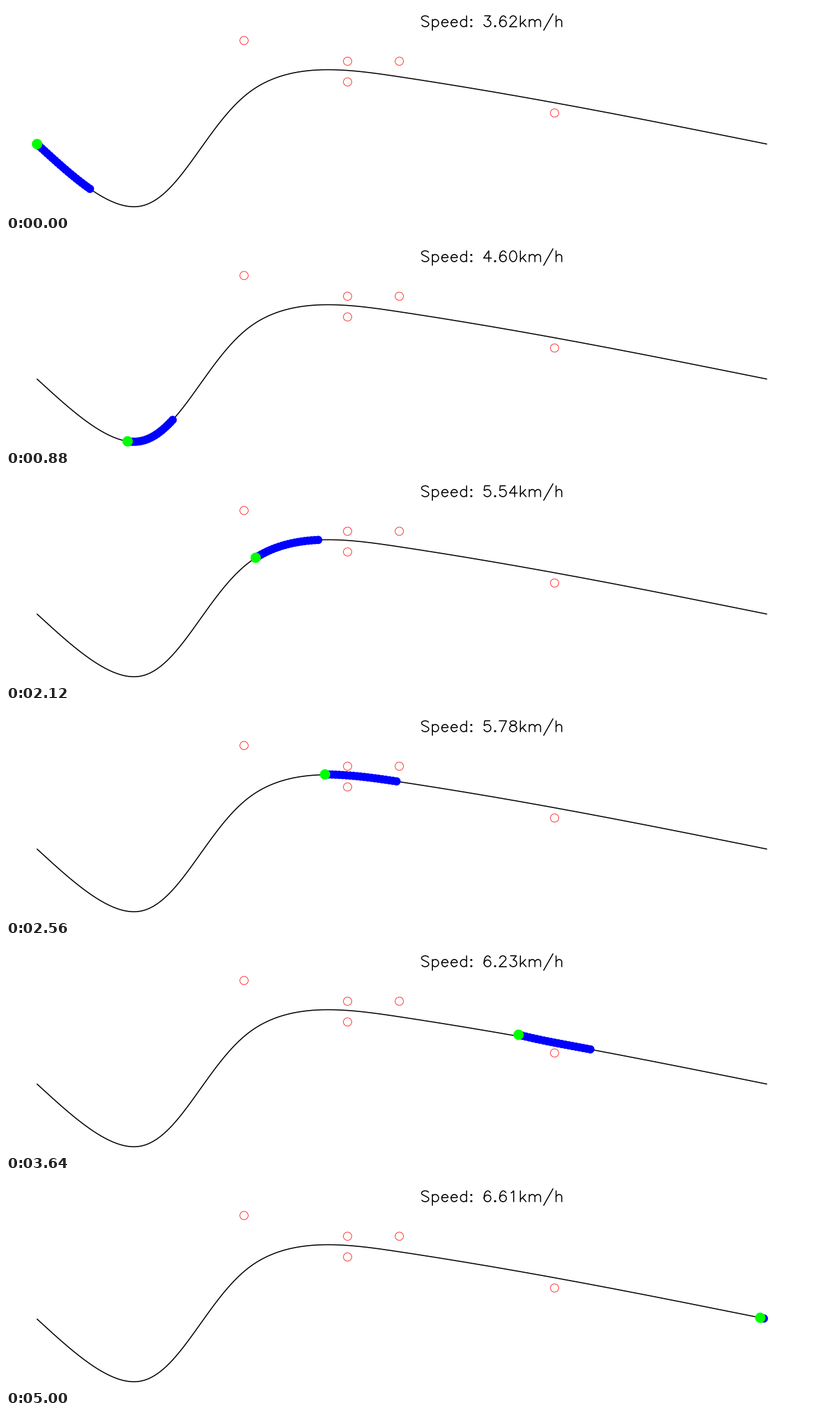
Animation, 1280 px wide and 320 px high, one loop 5.04 s. Source, as a matplotlib script:

```python
import numpy as np
import matplotlib.pyplot as plt
from matplotlib.animation import FuncAnimation
from matplotlib.collections import LineCollection, PolyCollection

W, H, DPI = 1280, 320, 80
PX = 72 / DPI                      # one pixel in points
FRAMES, LAST = 252, 250
SCALE, X0, Y0 = 16, 48, 213.4      # pixels per metre, world origin
DOTS = 20


def spline(t, y):
    """Natural cubic spline through (t, y)."""
    t, y = np.asarray(t, float), np.asarray(y, float)
    h, n = np.diff(t), len(t)
    a, b = np.eye(n), np.zeros(n)
    for i in range(1, n - 1):
        a[i, i - 1:i + 2] = h[i - 1], 2 * (h[i - 1] + h[i]), h[i]
        b[i] = 6 * ((y[i + 1] - y[i]) / h[i] - (y[i] - y[i - 1]) / h[i - 1])
    m = np.linalg.solve(a, b)

    def f(u):
        i = np.clip(np.searchsorted(t, u, side="right") - 1, 0, n - 2)
        p, q, k = t[i + 1] - u, u - t[i], h[i]
        return ((m[i] * p**3 + m[i + 1] * q**3) / (6 * k)
                + (y[i] / k - m[i] * k / 6) * p
                + (y[i + 1] / k - m[i + 1] * k / 6) * q)
    return f


def smooth(t, y):
    """Cubic trend plus a spline through what it leaves over."""
    t = np.asarray(t, float)
    trend = np.poly1d(np.polyfit(t / LAST, y, 3))
    rest = spline(t, y - trend(t / LAST))
    return lambda u: trend(u / LAST) + rest(u)


# Reference course
wx = np.array([0, 10, 20.5, 35, 70.5])
wy = np.array([0, -6, 5, 6.5, 0])
knots = np.concatenate([[0], np.cumsum(np.hypot(np.diff(wx), np.diff(wy)))])
length = knots[-1]
course_x = spline(knots, X0 + SCALE * wx)
course_y = spline(knots, Y0 - SCALE * wy)


def place(s, d=0.0):
    """Point at distance s along the course, d pixels to its left."""
    e = 0.01
    dx = course_x(s + e) - course_x(s - e)
    dy = course_y(s + e) - course_y(s - e)
    r = np.hypot(dx, dy)
    return np.column_stack([course_x(s) + d * dy / r,
                            course_y(s) - d * dx / r])


# Motion along the course
ss = np.linspace(0, length, 2000)
when = [0, 27, 44, 54, 81, 106, 135, 150, 162, 182, 223, 250]
seen = [48, 133, 188, 219, 299, 386, 531, 613, 680, 792, 1017, 1166]
travel = smooth(when, np.interp(seen, course_x(ss), ss))(np.arange(LAST + 1.0))
step = (travel[-1] - travel[-8]) / 7
travel = np.concatenate([travel, travel[-1] + step * np.arange(1, 40)])
ticks = np.arange(len(travel))

speed = smooth([0, 44, 106, 150, 182, 223, 250],
               [3.62, 4.60, 5.54, 5.99, 6.23, 6.48, 6.61])


def drift(n):
    return np.interp(n, [106, 130, 150, 182, 223], [0, 0.5, 3.7, 2.4, 0])


def reach(n):
    return np.interp(n, [0, 44, 106, 150, 200], [26, 23, 20, 20.6, 20])


# Single-stroke lettering: 21 units cap height, y upwards
def arc(cx, cy, rx, ry, a, b):
    t = np.radians(np.linspace(a, b, int(abs(b - a) / 22.5) + 2))
    return list(zip(cx + rx * np.cos(t), cy + ry * np.sin(t)))


def shoulder(x):
    return [(x, 10)] + arc(x + 6, 9, 5, 5, 130, 0) + [(x + 11, 0)]


def dot(y):
    return arc(5, y, 1, 1, 0, 360)


six = arc(11, 9, 7, 12, 45, 180) + arc(10.5, 6.5, 6.5, 6.5, 180, 540)

GLYPHS = {
    "S": [arc(10, 16.5, 7, 4.5, 25, 250) + arc(10, 5, 7, 5, 70, -155)],
    "p": [[(4, 14), (4, -7)], arc(9.5, 7, 6.5, 7, 148, -148)],
    "e": [[(3, 8)] + arc(9.2, 7, 6.2, 7, 8, 325)],
    "d": [[(15, 21), (15, 0)], arc(9.5, 7, 6.5, 7, 32, 328)],
    "k": [[(4, 21), (4, 0)], [(14, 14), (4, 4)], [(8, 8), (15, 0)]],
    "m": [[(4, 14), (4, 0)], shoulder(4), shoulder(15)],
    "h": [[(4, 21), (4, 0)], shoulder(4)],
    "/": [[(20, 25), (2, -7)]],
    ":": [dot(13), dot(1)],
    ".": [dot(1)],
    " ": [],
    "0": [arc(10, 10.5, 7, 10.5, 0, 360)],
    "1": [[(6, 17), (8, 18), (11, 21), (11, 0)]],
    "2": [arc(10, 15.5, 6, 5.5, 175, -25) + [(3, 0), (17, 0)]],
    "3": [[(5, 21), (16, 21), (10, 13)] + arc(10, 6.5, 7, 6.5, 80, -160)],
    "4": [[(13, 0), (13, 21), (3, 7), (18, 7)]],
    "5": [[(15, 21), (5, 21), (4, 12)] + arc(10, 7, 7, 7, 130, -157)],
    "6": [six],
    "7": [[(3, 21), (17, 21), (7, 0)]],
    "8": [arc(10, 16.8, 6, 4.2, 0, 360), arc(10, 6.2, 7, 6.2, 0, 360)],
    "9": [[(20 - x, 21 - y) for x, y in six]],
}
ADVANCE = {"p": 19, "e": 18, "d": 19, "k": 17, "m": 30, "h": 19,
           "/": 22, ":": 10, ".": 10, " ": 16}


def lettering(text, x, y, size=0.8):
    strokes = []
    for ch in text:
        strokes += [np.array(s) * [size, -size] + [x, y] for s in GLYPHS[ch]]
        x += size * ADVANCE.get(ch, 20)
    return strokes


def disc(c, r):
    t = np.linspace(0, 2 * np.pi, 48, endpoint=False)
    return c + r * np.column_stack([np.cos(t), np.sin(t)])


fig = plt.figure(figsize=(W / DPI, H / DPI), dpi=DPI, facecolor="white")
ax = fig.add_axes([0, 0, 1, 1])
ax.set(xlim=(0, W), ylim=(H, 0))
ax.axis("off")

ax.plot(*place(np.linspace(0, length, 706)).T, color="black", lw=1.6 * PX,
        solid_capstyle="round", solid_joinstyle="round", snap=False, zorder=1)

for ox, oy in [(20, 10), (30, 6), (30, 8), (35, 8), (50, 3)]:
    ax.add_patch(plt.Circle((X0 + SCALE * ox, Y0 - SCALE * oy), 6.4,
                            fill=False, ec="red", lw=0.8 * PX, zorder=2))

car = PolyCollection([], edgecolors="none", linewidths=0, zorder=3)
label = LineCollection([], colors="black", linewidths=1.6 * PX, zorder=4,
                       capstyle="round", joinstyle="round", snap=False)
ax.add_collection(car, autolim=False)
ax.add_collection(label, autolim=False)


def draw(i):
    n = min(i, LAST)
    u = np.arange(1, DOTS + 1) / DOTS
    s = np.interp(n + u * reach(n), ticks, travel)
    plan = place(s, drift(n) * (1 - u) ** 4)[s < length]
    here = place(travel[n:n + 1], drift(n))[0]
    car.set_verts([disc(p, 6.4) for p in plan] + [disc(here, 8)])
    car.set_facecolor(["blue"] * len(plan) + ["lime"])
    label.set_segments(lettering(f"Speed: {speed(float(n)):.2f}km/h", W / 2, H / 10))
    return car, label


anim = FuncAnimation(fig, draw, frames=FRAMES, interval=20, repeat=True,
                     repeat_delay=0, blit=False)
plt.show()
```
